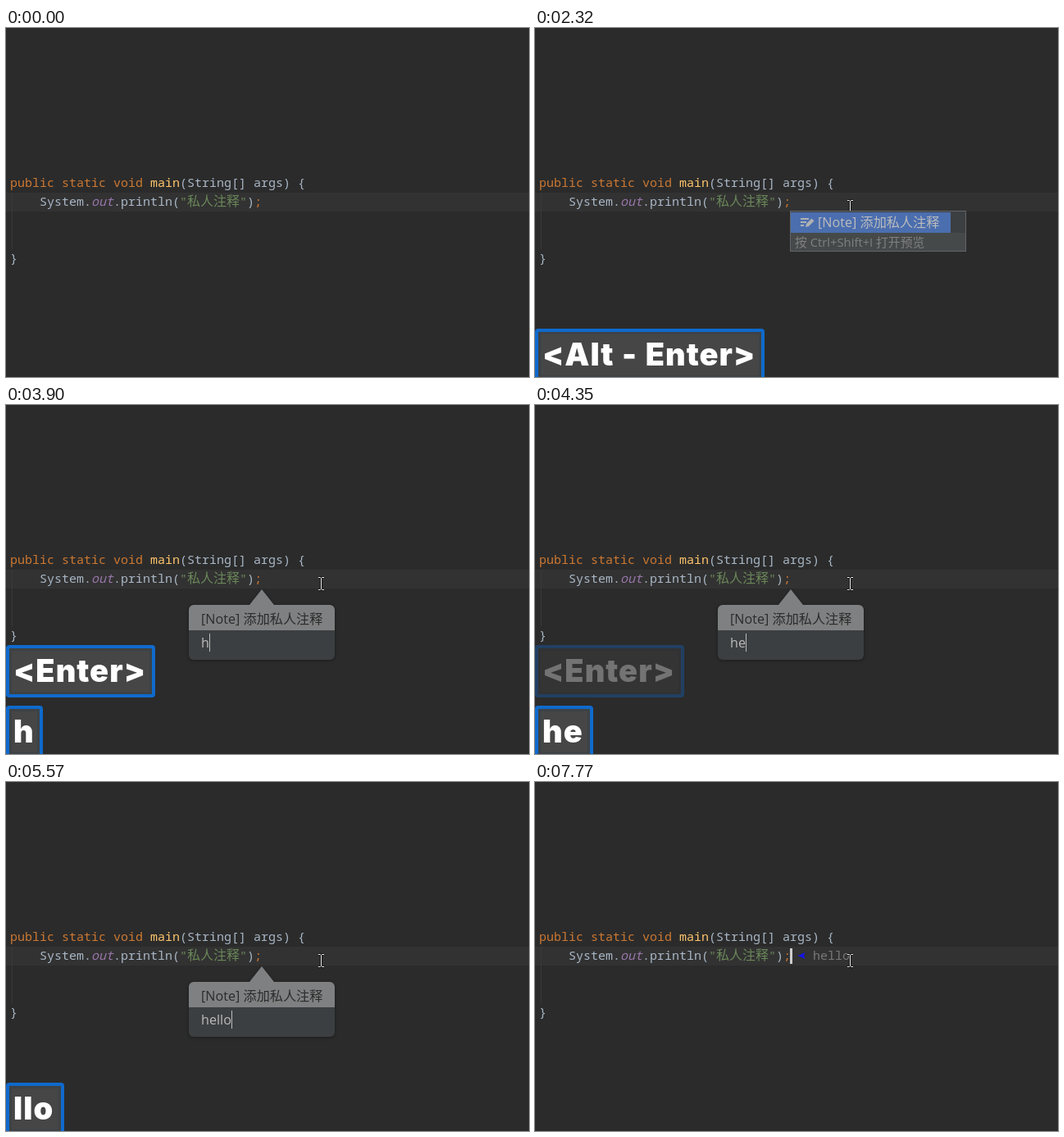
These frames come from a looping animation (638 px wide and 426 px high, 8000 ms). An HTML page:

```html
<!DOCTYPE html>
<html lang="zh-CN">
<head>
<meta charset="utf-8">
<title>私人注释</title>
<style>
  html, body { margin: 0; width: 100%; height: 100%; overflow: hidden; background: #2b2b2b; }
  svg { display: block; width: 638px; height: 426px; }
  text { white-space: pre; }
  .code { font: 15px "Noto Sans Mono", "Noto Sans CJK SC", "Noto Sans CJK", monospace; fill: #a9b7c6; }
  .ui { font: 16.150px "Open Sans", "Noto Sans CJK SC", "Noto Sans CJK", sans-serif; }
  .key { font: 900 38px Inter, "Noto Sans", sans-serif; letter-spacing: 1px; word-spacing: 1px; fill: #fff; }
  .word { fill: #cc7832; }
  .name { fill: #ffc66d; }
  .field { fill: #9876aa; font-style: italic; }
  .string { fill: #6a8759; }
  .hint { fill: #787878; }
  .footer { font-size: 14.800px; }
  .bubble { filter: drop-shadow(0 1px 2px rgba(0, 0, 0, .35)); }
</style>
</head>
<body>
<svg viewBox="0 0 638 426">
  <rect width="638" height="426" fill="#2b2b2b"/>
  <rect y="201" width="638" height="23" fill="#323232"/>
  <rect x="7" y="201" width="1" height="69" fill="#393939"/>

  <g class="code">
    <text x="5" y="194"><tspan class="word">public static void</tspan> <tspan class="name">main</tspan>(String[] args) {</text>
    <text x="41" y="217">System.<tspan class="field">out</tspan>.println(<tspan class="string">"<tspan font-size="16">私人注释</tspan>"</tspan>)<tspan class="word">;</tspan></text>
    <text x="5" y="286">}</text>
  </g>

  <g id="hint">
    <path d="M320.5 212l9-4-1.5 4 1.5 4z" fill="#1414e6"/>
    <text class="code" x="339" y="217"><tspan class="hint">hello</tspan></text>
  </g>
  <rect id="caret" x="311" y="203" width="3" height="19" fill="#ccc"/>

  <g id="click" fill="none">
    <circle cx="384" cy="218" r="10" stroke="#000"/>
    <circle cx="384" cy="218" r="9" stroke="#fff"/>
  </g>
  <g id="mouse" fill="none">
    <path id="beam" d="M381 210.500h2.500l1 1 1-1h2.500M384.500 211v14M381 225.500h2.500l1-1 1 1h2.500"/>
    <use href="#beam" stroke="#111" stroke-width="2.400"/>
    <use href="#beam" stroke="#eee"/>
  </g>

  <g id="popup" class="ui">
    <rect x="311.5" y="223.5" width="214" height="49" fill="#45494a" stroke="#616569"/>
    <rect x="312" y="224" width="213" height="26" fill="#3c3f41"/>
    <rect x="312" y="225" width="195" height="25" fill="#4b6eaf"/>
    <path d="M324 233h10M324 237h7M324 241h4" stroke="#afb1b3" stroke-width="1.8"/>
    <path d="M330 243l1-4 6.500-6.500 3 3-6.500 6.500z" fill="#afb1b3"/>
    <text x="345" y="243" fill="#bbb">[Note] 添加私人注释</text>
    <text class="footer" x="317" y="267" fill="#808080">按 Ctrl+Shift+I 打开预览</text>
  </g>

  <g id="balloon" class="ui">
    <g class="bubble">
      <path d="M223 275v30a6 6 0 0 0 6 6h166a6 6 0 0 0 6-6v-30z" fill="#3c3f41"/>
      <path d="M223 275v-25a6 6 0 0 1 6-6h68l15-19 15 19h68a6 6 0 0 1 6 6v25z" fill="#7f8081"/>
    </g>
    <text x="238" y="267" fill="#2b2b2b">[Note] 添加私人注释</text>
    <g id="input" fill="#bbb"></g>
  </g>

  <g id="keys"></g>
</svg>
<script>
const LOOP = 8000;
const $ = id => document.getElementById(id);

function add(parent, tag, attrs, text = '') {
  const el = document.createElementNS('http://www.w3.org/2000/svg', tag);
  for (const key in attrs) el.setAttribute(key, attrs[key]);
  el.textContent = text;
  return parent.appendChild(el);
}

function play(el, frames) {
  el.animate(frames, { duration: LOOP, iterations: Infinity });
}

// Each span is [from, to, fade-in ms, fade-out ms].
function show(el, ...spans) {
  const frames = [];
  const at = (time, opacity) => frames.push({ offset: time / LOOP, opacity });
  at(0, 0);
  for (const [from, to, fadeIn = 0, fadeOut = 0] of spans) {
    at(from, 0);
    at(from + fadeIn, 1);
    at(to - fadeOut, 1);
    at(to, 0);
  }
  at(LOOP, 0);
  play(el, frames);
}

// label, box width, shown from, moved up at, gone at, fade-out ms
const KEYS = [
  ['<Alt>', 130, 2050, 2240, 2240, 0],
  ['<Alt - Enter>', 280, 2240, 2980, 3680, 280],
  ['<Enter>', 182, 2980, 3900, 4450, 290],
  ['h', 45, 3900, 4140, 4140, 0],
  ['he', 71, 4140, 4980, 5570, 300],
  ['l', 33, 4980, 5170, 5170, 0],
  ['ll', 45, 5170, 5480, 5480, 0],
  ['llo', 71, 5480, 6900, 6900, 280]
];

// text, shown from, caret hidden at, replaced at
const TYPED = [
  ['', 3050, 3660, 3900],
  ['h', 3900, 4140, 4140],
  ['he', 4140, 4640, 4980],
  ['hel', 4980, 5170, 5170],
  ['hell', 5170, 5480, 5480],
  ['hello', 5480, 5980, 6500]
];

function addKey([label, width, from, up, end, fade]) {
  const box = add($('keys'), 'g', {});
  add(box, 'rect', { x: 2, y: 2, width: width - 4, height: 60, rx: 2, fill: '#3d4245', stroke: '#0f6acc', 'stroke-width': 4 });
  add(box, 'rect', { x: 7, y: 7, width: width - 14, height: 50, fill: '#464646' });
  add(box, 'text', { x: 9, y: 45, class: 'key' }, label);
  show(box, [from, end, 0, fade]);
  const low = 'translate(0px, 367px)', high = 'translate(0px, 293px)';
  play(box, [
    { offset: 0, transform: low },
    { offset: up / LOOP, transform: low },
    { offset: up / LOOP, transform: high },
    { offset: 1, transform: high }
  ]);
}

function addTyped([text, from, blink, end]) {
  const line = add($('input'), 'text', { x: 238, y: 296 }, text);
  const x = Math.round(238 + line.getComputedTextLength());
  show(line, [from, end]);
  show(add($('input'), 'rect', { x, y: 279, width: 1, height: 22 }), [from, blink]);
}

KEYS.forEach(addKey);
TYPED.forEach(addTyped);

show($('caret'), [970, 2010], [2240, 2320], [2980, 3050], [6300, 7290], [7770, LOOP]);
show($('popup'), [2280, 2980]);
show($('balloon'), [3050, 6500, 180, 180]);
show($('hint'), [6340, LOOP]);
show($('click'), [970, 1070]);
show($('mouse'), [20, LOOP]);

const MOVES = [[0, 152, 119], [20, 152, 119], [470, 1, 4], [620, 1, 4], [710, 0, 0], [LOOP, 0, 0]];
play($('mouse'), MOVES.map(([time, x, y]) => ({
  offset: time / LOOP,
  transform: `translate(${x}px, ${y}px)`,
  easing: time === 20 ? 'cubic-bezier(.3, .1, .4, 1)' : 'linear'
})));
</script>
</body>
</html>
```
